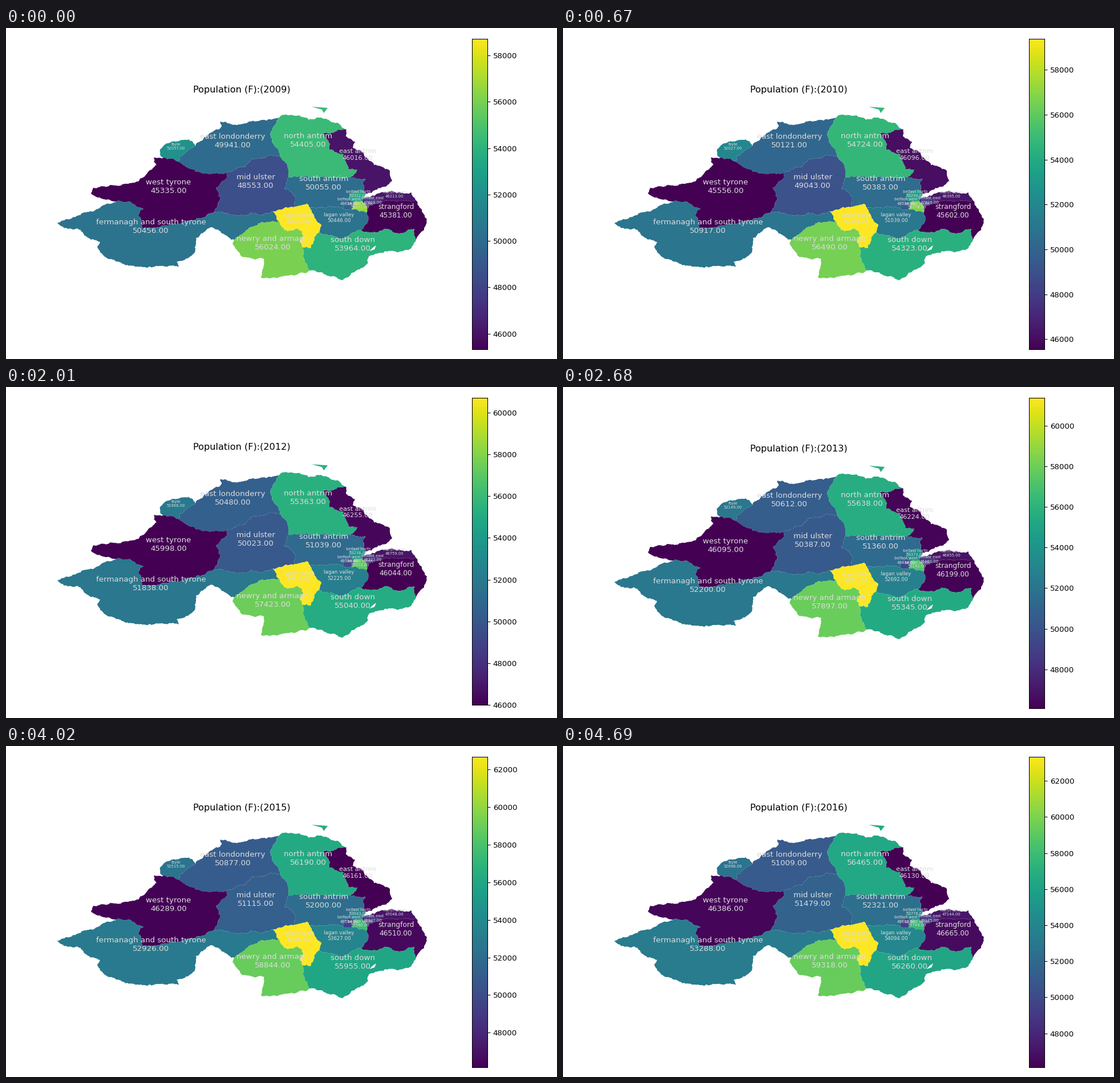
A matplotlib script for the animation above (7.37 s loop, 966 px wide and 580 px high).

```python
import math
import random

import matplotlib.pyplot as plt
import numpy as np
from matplotlib.animation import FuncAnimation
from matplotlib.patches import Polygon

W, H, DPI = 966, 580, 96
STEP_MS, STEPS = 670, 11
KEY_YEARS = (2009, 2012, 2016)
BAR_LEFT, BAR_TOP, BAR_BOTTOM = 817.2, 18.7, 562.8
TICK_HALF = 5.4
TEXT = 10.06

plt.rcParams.update({"font.family": "DejaVu Sans", "font.size": TEXT})

# Points where borders meet, one letter each.
nodes = dict(
    A=(200, 303), T=(275, 228), S=(302, 234), P=(387, 253), E=(364, 323),
    G=(468, 321), H=(478, 338), F=(400, 371), R=(333, 206), Q=(479, 157),
    O=(480, 225), U=(597, 178), V=(603, 262), N=(495, 262), M=(506, 313),
    L=(533, 315), K=(549, 358), J=(520, 385), I=(532, 425), W=(627, 285),
    X=(631, 290), Y=(621, 354), Z=(632, 324), a=(606, 318), b=(590, 316),
    c=(603, 300), d=(612, 304), e=(625, 303), f=(627, 297), g=(633, 314),
    h=(661, 304), k=(640, 295), m=(718, 301), n=(719, 371),
)
arcs = {}


def roughen(points, key, step=3.0, amount=0.11, reach=12):
    """Split every segment by midpoint displacement into a ragged line."""
    rng = random.Random(key)

    def split(p, q):
        length = math.dist(p, q)
        if length < step:
            return [q]
        push = np.clip(rng.gauss(0, amount), -0.2, 0.2) * min(1, reach / length)
        mid = ((p[0] + q[0]) / 2 - push * (q[1] - p[1]),
               (p[1] + q[1]) / 2 + push * (q[0] - p[0]))
        return split(p, mid) + split(mid, q)

    line = [points[0]]
    for p, q in zip(points, points[1:]):
        line += split(p, q)
    return line


def arc(ends, *between):
    start, end = ends
    arcs[ends] = roughen([nodes[start], *between, nodes[end]], ends)


def ring(path):
    """Join the arcs between successive nodes into a closed outline."""
    outline = []
    for p, q in zip(path, path[1:] + path[0]):
        if p + q not in arcs and q + p not in arcs:
            arc(p + q)
        line = arcs[p + q] if p + q in arcs else arcs[q + p][::-1]
        outline += line[:-1]
    return outline


# Key bends of the outer border, clockwise.
arc("FA", (383, 362), (360, 349), (333, 368), (331, 393), (299, 410), (303, 418),
    (247, 420), (205, 413), (172, 400), (160, 384), (165, 375), (143, 367),
    (130, 353), (108, 352), (87, 341), (146, 322), (165, 315))
arc("AT", (172, 300), (149, 289), (153, 280), (212, 273), (232, 269), (264, 240),
    (259, 227))
arc("TR", (270, 213), (290, 199), (320, 195))
arc("RQ", (348, 191), (376, 175), (376, 164), (405, 170), (448, 161))
arc("QU", (487, 152), (515, 153), (537, 160), (550, 157), (580, 166))
arc("UX", (596, 190), (612, 199), (608, 210), (625, 217), (645, 240), (672, 249),
    (677, 268), (645, 285))
arc("km", (662, 288), (710, 288))
arc("mn", (738, 335), (733, 354))
arc("nI", (712, 382), (688, 393), (665, 391), (636, 400), (634, 413), (590, 442),
    (552, 428))
arc("IF", (492, 434), (447, 437), (452, 404), (413, 400), (397, 378))

# Key bends of the inner borders; the rest run straight between nodes.
arc("RS", (317, 216), (304, 226))
arc("SP", (320, 246), (347, 255))
arc("PE", (388, 262), (368, 280), (376, 298))
arc("EA", (335, 333), (285, 346), (240, 351), (232, 328), (241, 317))
arc("EG", (400, 328), (430, 323), (445, 328))
arc("HF", (443, 342))
arc("QO", (466, 180), (466, 198))
arc("OP", (430, 230), (419, 244))
arc("ON", (492, 238))
arc("UV", (556, 184), (568, 203), (567, 213), (592, 222), (600, 247), (616, 248))
arc("NV", (545, 262))
arc("NM", (488, 281), (508, 297))
arc("VW", (630, 264))
arc("ML", (527, 308))
arc("LK", (541, 333), (553, 345))
arc("KJ", (541, 366), (534, 386))
arc("HJ", (494, 356), (512, 352), (521, 363), (515, 372))
arc("JI", (521, 401))
arc("cW", (602, 290))
arc("ZY", (634, 340))
arc("KY", (593, 368))
arc("Yn", (652, 358), (668, 352), (690, 360), (716, 352))

fig = plt.figure(figsize=(W / DPI, H / DPI), dpi=DPI, facecolor="white")
ax = fig.add_axes([0, 0, 1, 1])
ax.set_axis_off()
ax.set_xlim(0, W)
cmap = plt.get_cmap("viridis")
regions = []


def fill(points):
    return ax.add_patch(Polygon(points, facecolor="white", linewidth=0))


def region(name, path, center, scale, *counts, islet=None):
    patches = [fill(ring(path))]
    if islet:
        patches.append(fill(islet))
    label = ax.text(*center, "", size=TEXT * scale, color="gainsboro",
                    ha="center", va="center", zorder=5)
    regions.append((name, patches, label, counts))


# Label place and scale, then the counts in the key years.
region("foyle", "TRS", (297.7, 207.5), 0.5, 52057, 51966, 52698)
region("east londonderry", "RQOPS", (397.3, 197.7), 1, 49941, 50480, 51009)
region("north antrim", "QUVNO", (530, 196.8), 1, 54405, 55363, 56465,
       islet=[(536, 138), (564, 140), (557, 149), (554, 143)])
region("east antrim", "UXWV", (616.5, 222), 0.84, 46016, 46255, 46130)
region("west tyrone", "ATSPE", (285, 278.2), 1, 45335, 45998, 46386)
region("mid ulster", "PONMGE", (437.5, 269.2), 1, 48553, 50023, 51479)
region("south antrim", "NVWcbLM", (556.8, 272.2), 1, 50055, 51039, 52321)
region("belfast north", "WXfedc", (617.4, 290.5), 0.5, 53322, 53238, 53778)
region("belfast west", "cdab", (601.8, 304), 0.5, 49618, 49380, 49612)
region("belfast south", "degZa", (621, 311), 0.5, 56631, 57073, 57749)
region("belfast east", "fkhge", (642.5, 302), 0.5, 47628, 48222, 49175)
region("north down", "kmh", (681.3, 291.6), 0.5, 46213, 46759, 47144)
region("strangford", "mnYZgh", (683.5, 321.5), 0.9, 45381, 46044, 46665)
region("lagan valley", "LbaZYK", (584, 332.7), 0.65, 50446, 52225, 54094)
region("fermanagh and south tyrone", "AEGHF", (254, 347.8), 1,
       50456, 51838, 53288)
region("upper bann", "GMLKJH", (513, 334), 0.65, 58723, 60713, 63345)
region("newry and armagh", "FHJI", (468, 376.5), 1, 56024, 57423, 59318)
region("south down", "JKYnI", (608, 378.8), 1, 53964, 55040, 56260)
fill([(649, 381), (646, 388), (637, 391), (644, 384)])

title = ax.text(413, 113, "", size=1.2 * TEXT, ha="center", va="baseline")
bar = fig.add_axes([0, 0, 0.1, 0.1])
bar.imshow(np.linspace(0, 1, 256)[:, None], cmap=cmap, origin="lower",
           extent=(0, 1, 0, 1), aspect="auto", interpolation="nearest")
bar.set_xticks([])
bar.yaxis.tick_right()


def update(step):
    year = min(KEY_YEARS[0] + step, KEY_YEARS[-1])
    values = [round(np.interp(year, KEY_YEARS, r[3])) for r in regions]
    low, high = min(values), max(values)
    span = high - low

    for (name, patches, label, _), value in zip(regions, values):
        for patch in patches:
            patch.set_facecolor(cmap((value - low) / span))
        label.set_text(f"{name}\n{value:.2f}")
    title.set_text(f"Population (F):({year})")

    # A tick label hanging below the bar shrinks the layout from beneath.
    ticks = np.arange(math.ceil(low / 2000) * 2000, high, 2000)
    gap = (ticks[0] - low) / span * (BAR_BOTTOM - BAR_TOP)
    overhang = max(0, TICK_HALF - gap)
    ax.set_ylim(H + overhang / 2, overhang / 2)
    height = BAR_BOTTOM - BAR_TOP - overhang
    bar.set_position([BAR_LEFT / W, 1 - (BAR_TOP + height) / H,
                      height / 20 / W, height / H])
    bar.set_yticks((ticks - low) / span, [str(t) for t in ticks])
    bar.set_ylim(0, 1)
    return []


anim = FuncAnimation(fig, update, frames=STEPS, interval=STEP_MS,
                     repeat=True, repeat_delay=0, blit=False)
plt.show()
```
